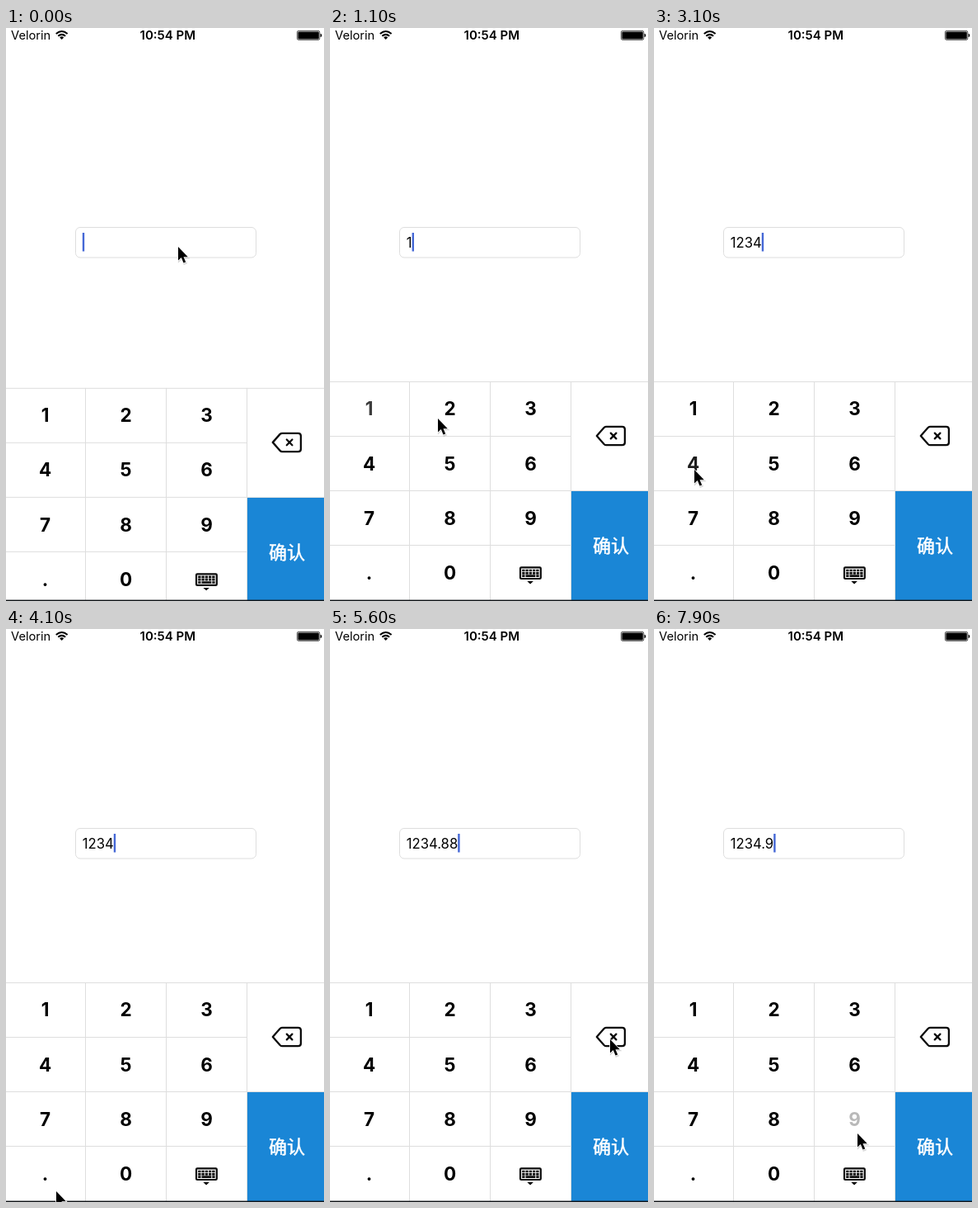
Animation, 386 px wide and 694 px high, one loop 8000 ms. Source, as an HTML page:

```html
<!DOCTYPE html>
<html lang="zh">
<head>
<meta charset="utf-8">
<title>Number pad</title>
<style>
  html, body { margin: 0; width: 100%; height: 100%; overflow: hidden; background: #fff; }
  svg { display: block; width: 100vw; height: 100vh; }
  text { font-family: Inter, Roboto, sans-serif; }
  .key { font-size: 22.5px; font-weight: 700; text-anchor: middle; }
  .line { stroke: #dedede; stroke-width: 1; fill: none; }
</style>
</head>
<body>
<svg viewBox="0 0 386 694">
  <rect width="386" height="694" fill="#fff"/>

  <g id="status">
    <text x="6" y="14" font-size="14.7">Velorin</text>
    <g fill="none" stroke="#000" stroke-width="2">
      <path d="M60.8 7.1Q67.7 .9 74.6 7.1"/>
      <path d="M63.3 9.8Q67.7 5.9 72.1 9.8"/>
    </g>
    <path d="M65.2 11.4Q67.7 9.2 70.2 11.4L67.7 14Z"/>
    <text x="196.3" y="14" font-size="15" font-weight="600" text-anchor="middle">10:54 PM</text>
    <rect x="353.4" y="3.4" width="27.4" height="11" rx="1.8" fill="#fff" stroke="#000" stroke-width=".7"/>
    <rect x="354.4" y="4.4" width="25.4" height="9" rx="1"/>
    <path d="M381.6 6.8Q383.4 7.2 383.4 8.9T381.6 11Z"/>
  </g>

  <rect class="line" x="84.5" y="241.5" width="219" height="36.5" rx="5.5"/>
  <text id="value" x="92.8" y="265.8" font-size="16.65"></text>
  <rect id="caret" y="248" width="2.4" height="22.5" fill="#4568d6"/>

  <g id="pad">
    <rect y="428" width="386" height="270" fill="#fff"/>
    <rect x="293" y="561" width="93" height="140" fill="#1a86d6"/>
    <path class="line" d="M0 428.5H386M0 494.5H292M0 560.5H386M0 626.5H292M96.5 428V694M194.5 428V694M292.5 428V694"/>
    <text x="341" y="634.8" font-size="22" font-weight="500" fill="#fff" stroke="#fff" stroke-width=".5"
      text-anchor="middle" style="font-family:'Noto Sans CJK SC','Noto Sans CJK',sans-serif">确认</text>
    <g fill="none" stroke="#0c0c0c" stroke-width="2.3" stroke-linejoin="round" stroke-linecap="round">
      <path d="M323.8 494L332.6 484Q333.8 482.9 335.5 482.9H354.5Q357.9 482.9 357.9 486V502Q357.9 505.2 354.5 505.2H335.5Q333.8 505.2 332.6 504Z"/>
      <path d="M340.8 490.6L347.4 497.4M347.4 490.6L340.8 497.4"/>
    </g>
    <rect x="231" y="653.4" width="24.8" height="13.6" rx="1.2" fill="#fff" stroke="#0c0c0c" stroke-width="2.2"/>
    <g stroke="#0c0c0c" stroke-width="2.7">
      <path d="M233.2 657H253.6M233.2 660.3H253.6" stroke-dasharray="3.3 .95"/>
      <path d="M233.2 663.6H236.5M237.5 663.6H249.3M250.3 663.6H253.6"/>
    </g>
    <path d="M239.4 670H246.8L243.1 673.4Z"/>
  </g>
  <rect y="692.6" width="386" height="1.4" fill="#101418"/>

  <g id="arrow">
    <path d="M.6 1.5V18L4.4 14.5L7.2 21L10 19.8L7.2 13.6H12.6Z" opacity=".16" stroke="#000" stroke-width="1.5"/>
    <path d="M0 0V16.6L3.8 13.1L6.5 19.6L9.2 18.4L6.5 12.2H11.8Z" stroke="#fff" stroke-width="1.5" paint-order="stroke"/>
  </g>
</svg>
<script>
const LOOP = 8000, GLIDE = 400;
const $ = id => document.getElementById(id);
const clamp = v => Math.max(0, Math.min(1, v));

// "<" deletes
const typed = "1234.88<<9";
const tapTimes = [900, 1300, 1700, 2850, 4400, 5000, 5200, 6400, 6600, 7900];

// where the pointer comes to rest: arrival time, x, y
const stops = [
  [0, 209, 265], [450, 161, 382], [900, 50, 468], [1100, 131, 473],
  [1650, 240, 478], [1800, 352, 680], [2200, 96, 532], [2700, 49, 535],
  [3500, 373, 559], [4100, 61, 681], [4800, 130, 618], [5600, 340, 497],
  [7300, 249, 659], [7700, 247, 611]
];

const keys = {};
[..."123456789.0"].forEach((c, i) => {
  const t = document.createElementNS("http://www.w3.org/2000/svg", "text");
  t.setAttribute("class", "key");
  t.setAttribute("x", 47.6 + 98 * (i % 3));
  t.setAttribute("y", 469.4 + 66.2 * Math.floor(i / 3));
  t.textContent = c;
  $("pad").append(t);
  keys[c] = t;
});

// rests at each stop, then glides to the next just in time
function pointer(t) {
  let [, x, y] = stops[0], left = 0;
  for (const [at, nx, ny] of stops.slice(1)) {
    const from = Math.max(left, at - GLIDE);
    const p = clamp((t - from) / (at - from));
    const k = p * p * (3 - 2 * p);
    x += (nx - x) * k;
    y += (ny - y) * k;
    left = at;
  }
  return [x, y];
}

// solid, fades out, stays hidden, fades back in
function blink(age) {
  const p = age % 1100;
  return p < 1000 ? 1 - clamp((p - 500) / 200) : (p - 1000) / 100;
}

function draw(t) {
  let text = "", last = 0;
  const pressed = {};
  tapTimes.forEach((at, i) => {
    if (at > t) return;
    const key = typed[i];
    text = key === "<" ? text.slice(0, -1) : text + key;
    pressed[key] = last = at;
  });
  for (const c in keys) {
    const alpha = c in pressed ? clamp(0.27 + 0.73 * (t - pressed[c]) / 300) : 1;
    keys[c].setAttribute("opacity", alpha);
  }

  const value = $("value");
  if (value.textContent !== text) value.textContent = text;
  $("caret").setAttribute("x", 92.8 + (text ? value.getComputedTextLength() : 0));
  $("caret").setAttribute("opacity", blink(t - last));

  const drop = 8 * (1 - clamp(t / 200)) ** 3;
  $("pad").setAttribute("transform", `translate(0 ${drop})`);
  $("arrow").setAttribute("transform", `translate(${pointer(t)})`);
}

const start = performance.now();
function tick() {
  draw((performance.now() - start) % LOOP);
  requestAnimationFrame(tick);
}
draw(0);
requestAnimationFrame(tick);
</script>
</body>
</html>
```
